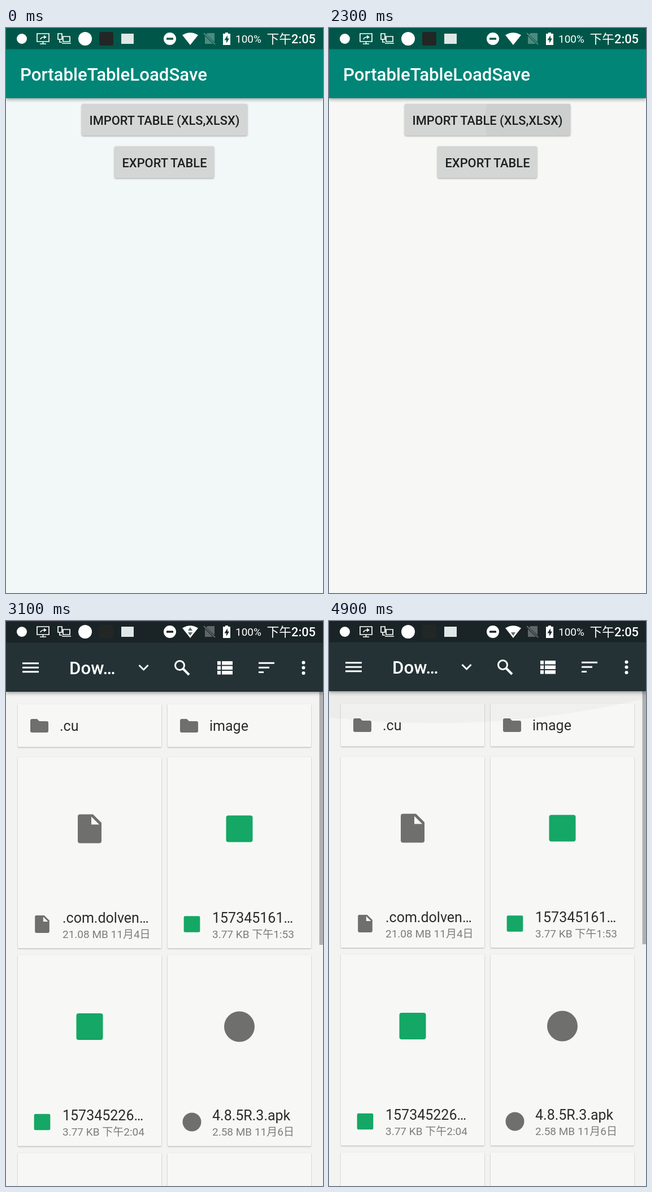
These frames come from a looping animation (561 by 998 pixels, 5000 ms). An HTML page:

```html
<!DOCTYPE html>
<html lang="en">
<head>
<meta charset="utf-8">
<title>Table import</title>
<style>
html, body { margin: 0; width: 100%; height: 100%; overflow: hidden; }
svg { display: block; width: 561px; height: 998px; font-family: Roboto, "Noto Sans CJK SC", "Noto Sans CJK JP", "Noto Sans CJK", sans-serif; }
.title { font-size: 31.2px; font-weight: 500; fill: #fff; }
.btn { font-size: 21.8px; font-weight: 500; fill: #1d1e1e; text-anchor: middle; }
.key { fill: #d4d6d5; filter: drop-shadow(0 1px 1.5px rgba(0,0,0,.35)); }
.bar { filter: drop-shadow(0 2px 3px rgba(0,0,0,.4)); }
.card { fill: #f7f8f6; filter: drop-shadow(0 1px 1px rgba(0,0,0,.28)); }
.name { font-size: 25px; fill: #2b2c2b; }
.info { font-size: 19px; fill: #7c7d7b; }
.line { fill: none; stroke: #fff; }
</style>
</head>
<body>
<svg viewBox="0 0 561 998">
  <defs>
    <clipPath id="keyClip"><rect x="134" y="134" width="293" height="56" rx="3"/></clipPath>
    <clipPath id="listClip"><rect y="124" width="561" height="874"/></clipPath>
    <path id="file" d="M4 0H27L42 15V47Q42 51 38 51H4Q0 51 0 47V4Q0 0 4 0ZM24 4V18H38Z" fill="#6f706e" fill-rule="evenodd"/>
    <path id="folder" d="M3 0H12L16 4H29Q32 4 32 7V21Q32 24 29 24H3Q0 24 0 21V3Q0 0 3 0Z" fill="#6f706e"/>
  </defs>

  <g id="home">
    <rect id="back" width="561" height="998"/>
    <rect class="bar" y="37" width="561" height="87" fill="#008577"/>
    <rect width="561" height="37.5" fill="#005749"/>
    <text class="title" x="25" y="93">PortableTableLoadSave</text>
    <rect class="key" x="134" y="134" width="293" height="56" rx="3"/>
    <circle id="ripple" cx="355" cy="163" clip-path="url(#keyClip)"/>
    <rect class="key" x="192" y="209" width="176" height="56" rx="3"/>
    <text class="btn" x="280.5" y="171">IMPORT TABLE (XLS,XLSX)</text>
    <text class="btn" x="280.5" y="246">EXPORT TABLE</text>
  </g>

  <g id="picker">
    <rect width="561" height="998" fill="#f3f4f2"/>
    <g id="cards"></g>
    <rect x="554.5" y="124" width="6.5" height="447" fill="#afb0af"/>
    <g clip-path="url(#listClip)"><ellipse id="glow" cx="185" rx="841"/></g>
    <rect class="bar" y="37" width="561" height="87" fill="#243236"/>
    <rect width="561" height="37.5" fill="#1a2427"/>
    <path class="line" stroke-width="3" d="M29 73.8H58M29 81.3H58M29 88.8H58M447 73.2H475M447 81.3H466M447 89.4H456"/>
    <text class="title" x="112" y="93">Dow…</text>
    <path class="line" stroke-width="3" d="M235.5 77L243.5 85L251.5 77"/>
    <g class="line" stroke-width="3"><circle cx="307.500" cy="77.500" r="8"/><path stroke-width="4" d="M313.500 83.500L324 94"/></g>
    <path fill="#fff" d="M374 70h6v6.500h-6zM374 78.500h6v6.500h-6zM374 87h6v6.500h-6zM382 70h19v6.500h-19zM382 78.500h19v6.500h-19zM382 87h19v6.500h-19z"/>
    <g fill="#fff"><circle cx="526.500" cy="72.500" r="3"/><circle cx="526.500" cy="81.500" r="3"/><circle cx="526.500" cy="91" r="3"/></g>
  </g>

  <g id="status" fill="#fff">
    <circle cx="28" cy="19" r="9"/>
    <g class="line" stroke-width="1.7">
      <path d="M55 10H76V24H55ZM60 28H71M65.500 24V28M61 20Q62 16 68 16"/>
      <path d="M92 10H99V20H92ZM101 15H113V24H101ZM99 27H115M95 20V25H99"/>
    </g>
    <path d="M67 12.500L72 16L67 19.500Z"/>
    <circle cx="140" cy="19" r="12"/>
    <rect x="165" y="7" width="25" height="24" rx="3" fill="#222625"/>
    <rect x="204" y="10" width="22" height="18" fill="#dfe8e6"/>
    <path fill-rule="evenodd" d="M279 19a11 11 0 0 1 22 0a11 11 0 0 1 -22 0ZM284 17.300V20.700H296V17.300Z"/>
    <path d="M326 30L312 12.500Q326 4 340 12.500Z"/>
    <path id="up" fill="#5d6b69" d="M322 17L326 11L330 17Z"/>
    <path id="down" fill="#5d6b69" d="M322 20H330L326 26Z"/>
    <g opacity=".3"><path d="M357 9H369V25L354 11ZM352 14L366 28H352Z"/><path class="line" stroke-width="2" d="M350 9L370 29"/></g>
    <path fill-rule="evenodd" d="M388 8H393V10H397V30H384V10H388ZM392 13L386.500 21.500H390V27L395 18.500H392Z"/>
    <text x="406" y="26" font-size="19">100%</text>
    <text x="548" y="27" font-size="21.800" text-anchor="end">下午<tspan font-weight="500">2:05</tspan></text>
  </g>
</svg>
<script>
const $ = id => document.getElementById(id);
const set = (el, attrs) => { for (const k in attrs) el.setAttribute(k, attrs[k]); };
const clamp = v => Math.max(0, Math.min(1, v));
const columns = [21, 286];

const card = (x, y, h) => `<rect class="card" x="${x}" y="${y}" width="254" height="${h}" rx="1"/>`;
const text = (cls, x, y, s) => `<text class="${cls}" x="${x}" y="${y}">${s}</text>`;

// Icons are centred on (x, y); k is their scale.
const icons = {
  file: (x, y, k) => `<use href="#file" transform="translate(${x - 21 * k} ${y - 25.5 * k}) scale(${k})"/>`,
  sheet: (x, y, k) => `<rect x="${x - 23.5 * k}" y="${y - 23.5 * k}" width="${47 * k}" height="${47 * k}" rx="${4 * k}" fill="#15a765"/>`,
  app: (x, y, k) => `<circle cx="${x}" cy="${y}" r="${27 * k}" fill="#6f706e"/>`
};

const folder = (x, name) => card(x, 146, 75.5) +
  `<use href="#folder" x="${x + 22}" y="172"/>` + text('name', x + 74, 193, name);

const entry = (x, y, icon, name, info) => card(x, y, 337.5) +
  icons[icon](x + 127, y + 126.5, 1) + icons[icon](x + 43, y + 295, .61) +
  text('name', x + 79, y + 292, name) + text('info', x + 79, y + 319, info);

const [left, right] = columns;
$('cards').innerHTML =
  folder(left, '.cu') + folder(right, 'image') +
  entry(left, 239.5, 'file', '.com.dolven…', '21.08 MB 11月4日') +
  entry(right, 239.5, 'sheet', '157345161…', '3.77 KB 下午1:53') +
  entry(left, 589, 'sheet', '157345226…', '3.77 KB 下午2:04') +
  entry(right, 589, 'app', '4.8.5R.3.apk', '2.58 MB 11月6日') +
  columns.map(x => card(x, 938.5, 80)).join('');

function draw(t) {
  set($('back'), { fill: t < 600 ? '#f2f8f8' : t < 1600 ? '#f4f9f9' : '#f7f8f6' });

  const press = clamp((t - 2100) / 600);
  set($('ripple'), { r: 240 * press, 'fill-opacity': press ? .035 : 0 });

  // The picker fades in while it slides up and slows down.
  const open = t - 2895;
  const slide = 80 * (1 - clamp(open / 350)) ** 5;
  set($('picker'), {
    opacity: t < 3000 ? 0 : clamp(open / 200),
    transform: `translate(0 ${t < 3200 ? Math.round(slide) : 0})`
  });

  const busy = t >= 2600 && t < 3500;
  set($('up'), { opacity: +busy });
  set($('down'), { opacity: +(busy || t >= 4200) });

  // Overscroll glow: a flattened circle hanging below the toolbar.
  const pull = clamp((t - 4200) / 700), flat = .5 * pull;
  set($('glow'), { cy: 124 - 728 * flat, ry: 841 * flat, 'fill-opacity': .028 * pull });
}

function tick() {
  draw(Math.floor(performance.now() % 5000 / 100) * 100);
  requestAnimationFrame(tick);
}
tick();
</script>
</body>
</html>
```
